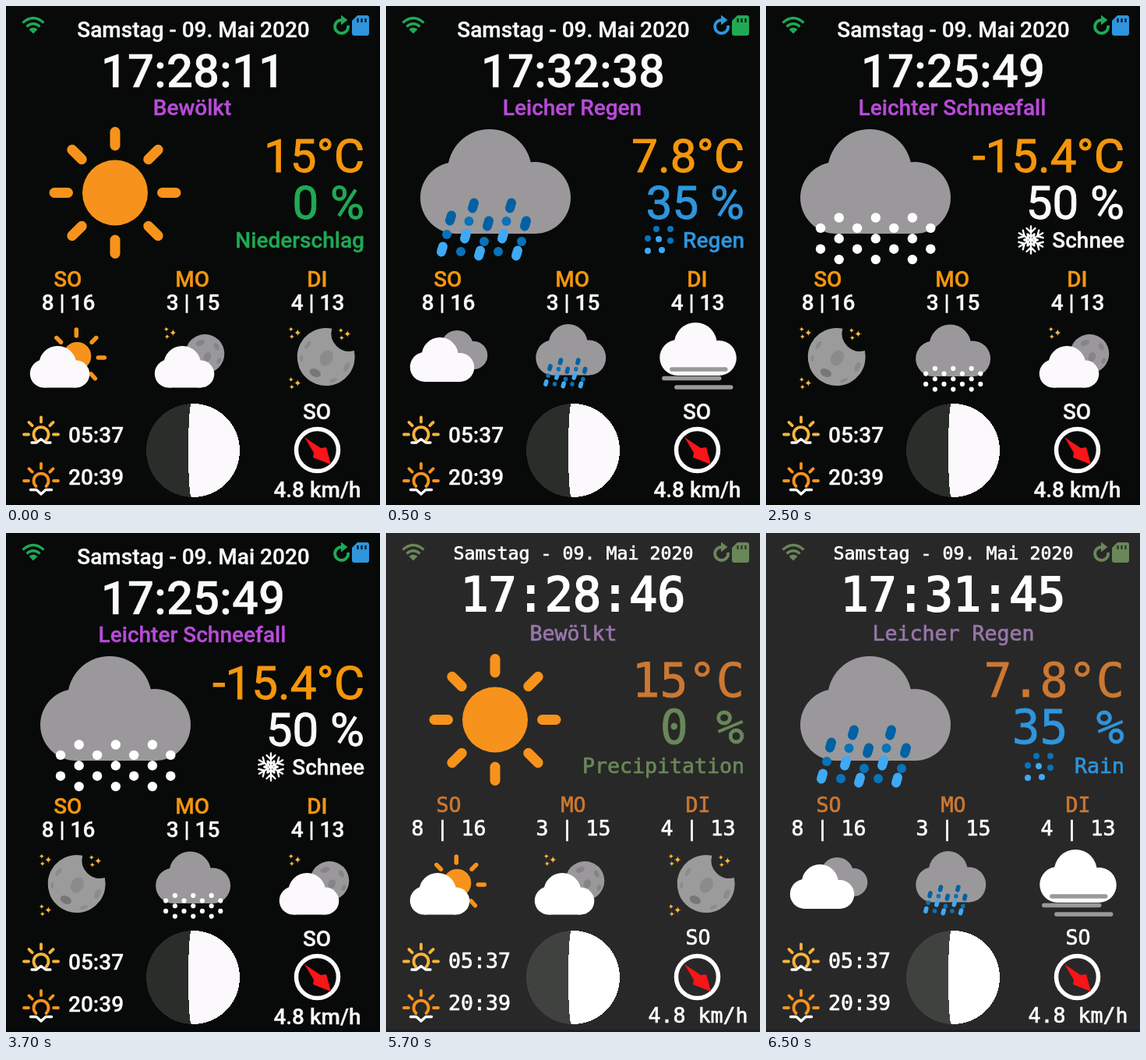
An HTML page for the animation above (8000 ms loop, 480 by 640 pixels).

```html
<!DOCTYPE html>
<html lang="de">
<head>
<meta charset="utf-8">
<title>Wetterstation</title>
<style>
html, body { margin: 0; width: 100%; height: 100%; overflow: hidden; background: #070a08; }
svg { display: block; position: absolute; left: 0; top: 0; }
text { white-space: pre; }
.sans { font-family: Roboto, sans-serif; font-weight: 500; stroke-width: .35; }
.sans .thin { font-weight: 400; stroke-width: 1; }
.mono { font-family: "DejaVu Sans Mono", monospace; font-weight: 400; stroke-width: .7; }
.mono .thin { stroke-width: .8; }
.mono .bold { stroke-width: 2; }
</style>
</head>
<body>
<svg id="stage" width="480" height="640" viewBox="0 0 480 640"></svg>
<script>
const ORANGE = '#f7931c', AMBER = '#f9b43c', GREY = '#9a989b', BLUE = '#2f95dc';
const DEEP = '#0061a3', MID = '#0873ba', LIGHT = '#3fa9f5';

const dark = {
  cls: 'sans', bg: '#070a08', white: '#fcf9fc', orange: '#f5960c', green: '#20a955',
  purple: '#b94bd9', shade: '#2b2d2b', big: 60, head: 28, size: 28,
  y: { head: 40, time: 103.5, state: 140, temp: 213, rain: 273, label: 310, day: 360, range: 390, rise: 560, set: 614, dir: 530, wind: 630 }
};
const soft = {
  cls: 'mono', bg: '#282828', white: '#fff', orange: '#cc7832', green: '#6a8759',
  purple: '#9876aa', shade: '#40423f', big: 60, head: 23.25, size: 26.58,
  y: { head: 34, time: 99.5, state: 138, temp: 209.5, rain: 269.5, label: 308, day: 358, range: 388, rise: 558, set: 612, dir: 528, wind: 628 }
};

const circle = (x, y, r, fill) => `<circle cx="${x}" cy="${y}" r="${r}" fill="${fill}"/>`;
const oval = (x, y, rx, ry, turn, fill) =>
  `<ellipse cx="${x}" cy="${y}" rx="${rx}" ry="${ry}" transform="rotate(${turn} ${x} ${y})" fill="${fill}"/>`;
const shape = (d, fill) => `<path d="${d}" fill="${fill}"/>`;
const line = (d, color, width, cap = 'round') =>
  `<path d="${d}" fill="none" stroke="${color}" stroke-width="${width}" stroke-linecap="${cap}" stroke-linejoin="round"/>`;
const group = (transform, body) => `<g transform="${transform}">${body}</g>`;
const text = (s, x, y, size, fill, anchor = 'middle', cls = '') =>
  `<text x="${x}" y="${y}" font-size="${size}" fill="${fill}" stroke="${fill}" text-anchor="${anchor}" class="${cls}">${s}</text>`;

// Rays at the given angles, 0 being straight up
const rays = (x, y, from, to, angles, color, width) => angles.map(a =>
  group(`rotate(${a} ${x} ${y})`, line(`M${x} ${y - from}V${y - to}`, color, width))).join('');

// Three lobes [x, y, r] on a flat base
function cloud(fill, left, top, right) {
  const base = left[1] + left[2];
  return [left, top, right].map(([x, y, r]) => circle(x, y, r, fill)).join('') +
    shape(`M${left[0]} ${base}V${top[1]}H${right[0]}V${base}Z`, fill);
}

function sun() {
  return circle(140, 239.5, 42, ORANGE) +
    rays(140, 239.5, 60.5, 78, [0, 45, 90, 135, 180, 225, 270, 315], ORANGE, 13);
}

const greyCloud = () => cloud(GREY, [90, 246, 46], [133, 212, 54], [191, 246, 46]);

function rain() {
  const drop = (x, y, c) => line(`M${x - 1} ${y + 3.4}L${x + 1} ${y - 3.4}`, c, 12);
  let out = greyCloud();
  for (const x of [112, 160])
    out += drop(x, 256, DEEP) + circle(x - 5.5, 276, 6, MID) + drop(x - 10, 295, LIGHT) + circle(x - 16, 315, 6, MID);
  for (const [x, y] of [[83, 272], [131, 279], [179, 279]])
    out += drop(x, y, DEEP) + circle(x - 5, y < 275 ? 293 : 302, 6, MID) + drop(x - 11, y < 275 ? 312 : 317, LIGHT);
  return out;
}

function snow() {
  let out = greyCloud();
  for (let row = 0; row < 5; row++)
    for (let i = 0; i < 3 + row % 2; i++)
      out += circle((row % 2 ? 70 : 93.7) + i * 47.1, 271.5 + row * 13.4, 6.2, '#fff');
  return out;
}

const star = (x, y, r) => shape(
  `M${x} ${y - r}Q${x} ${y} ${x + r} ${y}Q${x} ${y} ${x} ${y + r}Q${x} ${y} ${x - r} ${y}Q${x} ${y} ${x} ${y - r}Z`, AMBER) +
  circle(x, y, r * .42, AMBER);
const stars = (x, y) => star(x + 4, y, 5) + star(x - 4.5, y - 4.5, 3.8) + star(x - 3.5, y + 5, 3.8);

// Small icons are drawn in the left column
function sunCloud(t) {
  return circle(91, 449, 18, ORANGE) +
    rays(90, 451, 28, 36, [0, 45, 90, 138, 315], ORANGE, 5.5) + frontCloud(t);
}
const frontCloud = t => cloud(t.white, [48.5, 471.5, 18], [66, 460, 24], [89.5, 472, 17.5]);

function moonCloud(t) {
  return circle(95, 446, 25, GREY) +
    oval(98, 450, 4.5, 6, 25, '#858487') + oval(89, 432, 6, 3.5, -20, '#858487') +
    oval(110, 437, 3, 5, -25, '#858487') + oval(113, 455, 2.5, 4, 25, '#858487') +
    frontCloud(t) + stars(50, 419);
}

function moon() {
  return shape('M98 413.8A37 37 0 1 0 126.5 442A23 23 0 0 1 98 413.8Z', '#9c9b9c') +
    oval(91, 451.5, 8, 10.5, 30, '#8c8b8c') + oval(76.5, 470.5, 7.5, 5, 25, '#777678') +
    oval(67, 435, 2.5, 6, 35, '#8c8b8c') + oval(117, 463, 3.5, 6.5, 25, '#8c8b8c') +
    oval(100, 480, 5, 2, -20, '#8c8b8c') + oval(59, 452, 2, 4, 5, '#8c8b8c') +
    stars(50, 419) + stars(114, 420.5) + stars(50, 483.5);
}

const clouds = t => cloud(GREY, [75, 448, 18], [91, 437, 21], [112, 448, 18]) +
  cloud(t.white, [49.5, 463, 19], [69, 448.5, 23.5], [94.5, 463.5, 18.5]);

const fog = t => cloud(t.white, [54, 451, 23], [77, 433.5, 27.5], [107, 451.5, 22.5]) +
  line('M46.5 466H115.5M36.5 477.5H107.5M52.5 489H122.5', GREY, 5.4);

const smallRain = () => group('translate(11.5 330.5) scale(.466 .49)', rain());
const smallSnow = () => group('translate(10 330) scale(.497 .497)', snow());

function flake(color) {
  let out = '';
  for (let a = 0; a < 360; a += 60)
    out += group(`rotate(${a} 340 300)`, line('M340 300V282.5M334.5 285L340 290.5L345.5 285M336 292.5L340 296.5L344 292.5', color, 2.4));
  return out;
}

function droplets() {
  const deep = [[347, 286], [365, 286], [336, 298], [365, 301]];
  const light = [[350, 299], [336, 314], [354, 313]];
  return deep.map(([x, y]) => circle(x, y, 4, MID)).join('') +
    light.map(([x, y]) => circle(x, y, 4, LIGHT)).join('');
}

function statusIcons(t, sync, card) {
  return shape('M35 35.5L29.5 30Q35 25.5 40.5 30Z', t.green) +
    line('M26.5 26.5Q35 19 43.5 26.5M21.5 21.5Q35 9.5 48.5 21.5', t.green, 3.2, 'butt') +
    line('M439 25A8.5 8.5 0 1 1 431 18', sync, 3.8, 'butt') +
    shape('M430 11.5L438.5 18L430 24.5Z', sync) +
    shape('M451 12H463Q466 12 466 15V35Q466 38 463 38H447Q444 38 444 35V19Z', card) +
    line('M451.5 16V21M456.5 16V21M461.5 16V21', t.bg, 2, 'butt');
}

function twilight(y, color, edge, white) {
  return rays(45, y, 16, 22, [0, 45, 90, 270, 315], color, 3.8) +
    line(`M38.5 ${y + 7}A9.5 9.5 0 1 1 51.5 ${y + 7}`, color, 3.8) +
    line(edge, white, 3.4);
}

function footer(t) {
  const w = t.white, y = t.y, s = t.size;
  return twilight(549.5, AMBER, 'M33 560H39L45 555.5L51 560H57', w) +
    twilight(609, ORANGE, 'M31.5 620.5H39L45 626L51 620.5H58.5', w) +
    text('05:37', 80, y.rise, s, w, 'start') + text('20:39', 80, y.set, s, w, 'start') +
    `<g shape-rendering="crispEdges">${circle(240, 570, 60, t.shade)}` +
    shape('M238 510H240A60 60 0 0 1 240 630H238A4 60 0 0 1 238 510Z', w) + '</g>' +
    `<circle cx="399.5" cy="569.5" r="27" fill="none" stroke="${w}" stroke-width="5.5"/>` +
    shape('M417 588L411 566L404 567L383 553L395 573L394 579Z', '#fb1418') +
    text('SO', t === dark ? 399 : 400.5, y.dir, s, w) +
    text('4.8 km/h', t === dark ? 399.5 : 400.5, y.wind, s, w);
}

function scene(v) {
  const t = v.theme, y = t.y, w = t.white;
  const ranges = ['8 | 16', '3 | 15', '4 | 13'];
  const days = ['SO', 'MO', 'DI'].map((d, i) => {
    const x = 80 + i * 160;
    return text(d, t === dark ? x - .7 : x + .5, y.day, t.size, t.orange) +
      text(ranges[i], t === dark ? x : x + .5, y.range, t.size, w) +
      group(`translate(${i * 160 + .3} 0)`, v.icons[i](t));
  }).join('');
  return `<g class="${t.cls}" display="none"><rect width="480" height="640" fill="${t.bg}"/>` +
    '<rect y="637" width="480" height="3" fill="#000" opacity=".22"/>' +
    statusIcons(t, v.sync, v.card) +
    text('Samstag - 09. Mai 2020', 240.5, y.head, t.head, w) +
    text(v.time, 240, y.time, t.big, w, 'middle', 'bold') +
    text(v.state, t === dark ? 239 : 240.5, y.state, t.size, t.purple) +
    v.main() +
    text(v.temp, 460, y.temp, t.big, t.orange, 'end', 'thin') +
    text(v.chance, 460, y.rain, t.big, v.color, 'end', 'thin') +
    text(v.label, 460, y.label, t.size, v.color, 'end') +
    (v.mark ? v.mark(v.color) : '') + days + footer(t) + '</g>';
}

const sunny = { state: 'Bewölkt', main: sun, temp: '15°C', chance: '0 %', icons: [sunCloud, moonCloud, moon] };
const rainy = { state: 'Leicher Regen', main: rain, temp: '7.8°C', chance: '35 %', color: BLUE, mark: droplets, icons: [clouds, smallRain, fog] };
const snowy = { state: 'Leichter Schneefall', main: snow, temp: '-15.4°C', chance: '50 %', color: dark.white, mark: flake, icons: [moon, smallSnow, moonCloud] };

const views = [
  { ...sunny, at: 0, theme: dark, time: '17:28:11', label: 'Niederschlag', color: dark.green, sync: dark.green, card: BLUE },
  { ...rainy, at: 500, theme: dark, time: '17:32:38', label: 'Regen', sync: BLUE, card: dark.green },
  { ...snowy, at: 2500, theme: dark, time: '17:25:49', label: 'Schnee', sync: dark.green, card: BLUE },
  { ...sunny, at: 4500, theme: soft, time: '17:28:46', label: 'Precipitation', color: soft.green, sync: soft.green, card: soft.green },
  { ...rainy, at: 6500, theme: soft, time: '17:31:45', label: 'Rain', sync: soft.green, card: soft.green }
];

const stage = document.getElementById('stage');
stage.innerHTML = views.map(scene).join('');
const layers = [...stage.children];
const start = performance.now();

function draw(now) {
  const ms = Math.max(0, now - start) % 8000;
  const current = views.filter(v => v.at <= ms).length - 1;
  layers.forEach((g, i) => g.setAttribute('display', i === current ? 'inline' : 'none'));
  requestAnimationFrame(draw);
}
draw(start);
</script>
</body>
</html>
```
